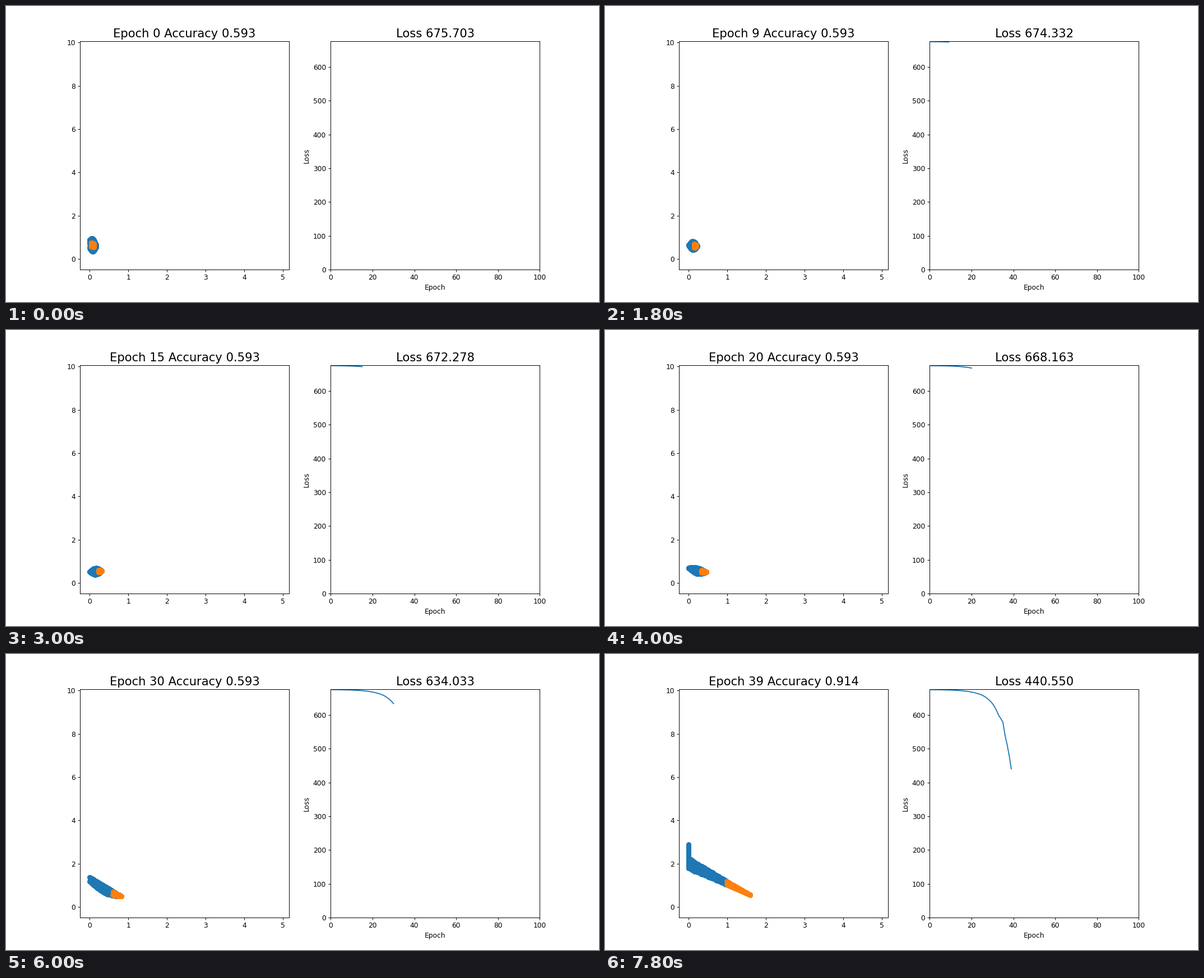
Write a matplotlib script that moves like this. It is 1058 px wide and 529 px high and loops after 8000 ms.

```python
import numpy as np
import matplotlib.pyplot as plt
from matplotlib.animation import FuncAnimation

EPOCHS = 40
START_LOSS = 675.703
plt.rcParams["font.family"] = "DejaVu Sans"

# The cloud is a curved band from a tail to a tip, given at a few epochs.
KEYS = [0, 9, 15, 25, 30, 35, 39]
BAND = {
    "tail_y": [.69, .64, .52, .88, 1.28, 1.82, 2.56],
    "tip_x": [.18, .23, .32, .61, .83, 1.40, 1.60],
    "tip_y": [.60, .60, .56, .47, .49, .34, .555],
    "bow": [0, 0, 0, .09, .10, .13, 0],
    "taper": [.20, 0, 0, .03, .11, .08, .35],
    "bulge": [.20, .21, .16, .12, .11, .13, 0],
}


def sample(count, rng):
    """Random places along (0 to 1) and across (-1 to 1) the band."""
    across = rng.uniform(-1, 1, count)
    return rng.uniform(0, 1, count), np.sign(across) * np.abs(across) ** .6


def place(points, epoch, start, end, thickness=1):
    along, across = points
    s = start + (end - start) * along
    band = {name: np.interp(epoch, KEYS, row) for name, row in BAND.items()}
    arch = np.sin(np.pi * s)
    half = thickness * (band["taper"] * (1 - s) + band["bulge"] * arch)
    tail_x = np.interp(epoch, [35, 39], [0, -.6])
    x = tail_x + (band["tip_x"] - tail_x) * s
    y = band["tail_y"] + (band["tip_y"] - band["tail_y"]) * s
    y = y - band["bow"] * arch + half * across
    return np.column_stack([np.maximum(x, 0), y])


rng = np.random.default_rng(4)
blue_points = sample(593, rng)
orange_points = sample(407, rng)

epochs = np.arange(EPOCHS)
drop = np.exp(np.interp(
    epochs, [0, 9, 15, 25, 30, 33, 35, 36, 39],
    np.log([.35, 1.371, 3.425, 16.599, 41.67, 77, 96.785, 135.5, 235.153])))
drop[0] = 0
loss = START_LOSS - drop
accuracy = np.interp(epochs, [30, 31, 35, 39], [.593, .597, .825, .914])

fig, (cloud_ax, loss_ax) = plt.subplots(1, 2, figsize=(12, 6), dpi=1058 / 12)
cloud_ax.set(xlim=(-.2456, 5.157), ylim=(-.478, 10.045))
loss_ax.set(xlim=(0, 100), ylim=(0, START_LOSS), xlabel="Epoch", ylabel="Loss")
blue_dots = cloud_ax.scatter([], [], color="tab:blue")
orange_dots = cloud_ax.scatter([], [], color="tab:orange")
curve, = loss_ax.plot([], [], color="tab:blue")


def draw(epoch):
    blue_end = np.interp(epoch, [30, 35, 39], [.97, .9, .73])
    orange_start = np.interp(epoch, [0, 9, 15], [.2, .6, .72])
    orange_end = np.interp(epoch, [0, 9, 15], [.65, .85, 1])
    thickness = .3 + .6 * epoch / (EPOCHS - 1)
    blue_dots.set_offsets(place(blue_points, epoch, 0, blue_end))
    orange_dots.set_offsets(
        place(orange_points, epoch, orange_start, orange_end, thickness))
    curve.set_data(epochs[:epoch + 1], loss[:epoch + 1])
    cloud_ax.set_title(f"Epoch {epoch} Accuracy {accuracy[epoch]:.3f}",
                       fontsize="xx-large")
    loss_ax.set_title(f"Loss {loss[epoch]:.3f}", fontsize="xx-large")
    return blue_dots, orange_dots, curve


anim = FuncAnimation(fig, draw, frames=EPOCHS, interval=200, repeat=True)
plt.show()
```
